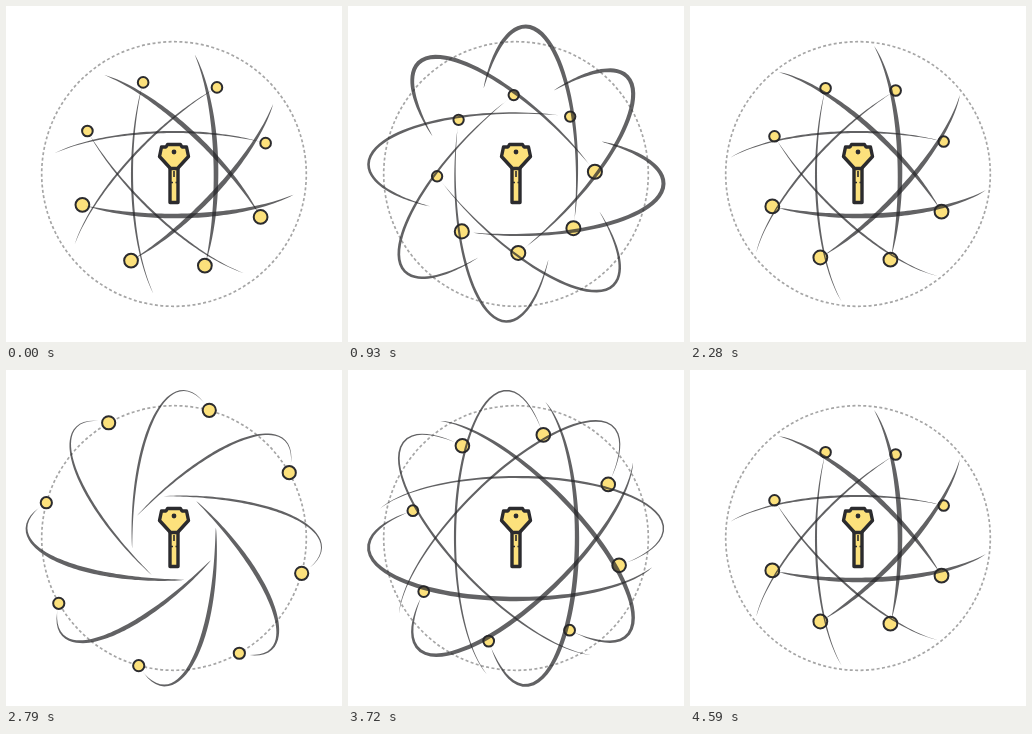
An HTML page that plays this animation: 336 px wide and 336 px high, repeating every 4620 ms.

```html
<!DOCTYPE html>
<html lang="en">
<head>
<meta charset="utf-8">
<title>Key atom</title>
<style>
  html, body { margin: 0; width: 100%; height: 100%; overflow: hidden; background: #fff; }
  svg { display: block; width: 100vw; height: 100vh; }
</style>
</head>
<body>
<svg viewBox="0 0 336 336">
  <circle id="ring" r="132.3" fill="none" stroke="#a6a6a6" stroke-width="1.7" pathLength="831.6" stroke-dasharray="3 2.4"/>
  <g stroke="#2b2b2e" stroke-width="3.4" stroke-linejoin="round" fill="#fce17c">
    <path d="M164 161H172V196.5H164Z"/>
    <path d="M161.5 138.5H174.5L176 141H180.5L182.5 150.5L171.5 162.5H164.5L153.5 150.5L155.5 141H160Z"/>
    <circle cx="168" cy="146" r="2.4" fill="#2b2b2e" stroke="none"/>
    <path d="M168 165V171M165 176.5H167M169.5 176.5H172" stroke-width="1.6" fill="none"/>
  </g>
  <g id="balls" transform="translate(168 168)" fill="#fce17c" stroke="#2b2b2e" stroke-width="2"></g>
  <g id="trails" transform="translate(168 168)" fill="#262629" fill-opacity=".72"></g>
</svg>
<script>
const PERIOD = 2310, LOOP = 2 * PERIOD, TRAIL = 960, STEPS = 64;
const A = 147.5, B = 51.5, SHIFT = 9.5;
const DASHES = 154, DRIFT = 5;
const RAD = Math.PI / 180;

// Arc length along the orbit, one entry per half degree
const arc = [0];
for (let i = 0; i < 720; i++) {
  const q = (i + 0.5) / 2 * RAD;
  arc.push(arc[i] + Math.hypot(A * Math.sin(q), B * Math.cos(q)) * RAD / 2);
}
const LENGTH = arc[720];

function arcAt(deg) {
  const i = Math.floor(deg * 2);
  return arc[i] + (arc[i + 1] - arc[i]) * (deg * 2 - i);
}

function angleAt(s) {
  s = ((s % LENGTH) + LENGTH) % LENGTH;
  let lo = 0, hi = 720;
  while (hi - lo > 1) {
    const mid = (lo + hi) >> 1;
    if (arc[mid] <= s) lo = mid; else hi = mid;
  }
  return (lo + (s - arc[lo]) / (arc[hi] - arc[lo])) / 2 * RAD;
}

// Time and orbit angle of the pace changes
const keys = [[375, 0], [930, 111.4], [1410, 225.5], [1740, 258], [2310, 308.3]]
  .map(([t, deg]) => [t, arcAt(deg)]);
const N = keys.length;

function key(i) {
  const turn = Math.floor(i / N), k = keys[i - turn * N];
  return [k[0] + turn * PERIOD, k[1] + turn * LENGTH];
}

function slope(i) {
  const [t0, s0] = key(i - 1), [t1, s1] = key(i), [t2, s2] = key(i + 1);
  const h0 = t1 - t0, h1 = t2 - t1;
  return ((s1 - s0) / h0 * h1 + (s2 - s1) / h1 * h0) / (h0 + h1);
}

function angle(t) {
  t = ((t % PERIOD) + PERIOD) % PERIOD;
  let i = -1;
  while (key(i + 1)[0] <= t) i++;
  const [t0, s0] = key(i), [t1, s1] = key(i + 1);
  const h = t1 - t0, u = (t - t0) / h, v = 1 - u;
  return angleAt(s0 * v * v * (1 + 2 * u) + s1 * u * u * (3 - 2 * u)
    + h * u * v * (slope(i) * v - slope(i + 1) * u));
}

const point = q => [A * Math.cos(q), SHIFT + B * Math.sin(q)];

function add(parent, tag, turn) {
  const el = document.createElementNS("http://www.w3.org/2000/svg", tag);
  el.setAttribute("transform", `rotate(${turn})`);
  document.getElementById(parent).appendChild(el);
  return el;
}

const ring = document.getElementById("ring");
const orbits = [];
for (let k = 0; k < 8; k++) {
  orbits.push({
    side: k < 4 ? 1 : -1,
    ball: add("balls", "circle", -45 * k),
    trail: add("trails", "path", -45 * k)
  });
}

// Tapered ribbon following the recent motion, as wide as its middle is near
function ribbon(angles, side) {
  const left = [], right = [];
  const width = 3.4 + 1.3 * side * Math.sin(angles[Math.round(STEPS * 0.45)]);
  angles.forEach((q, i) => {
    const u = Math.max(0, (i / STEPS - 0.03) / 0.97);
    const w = width / 2 * Math.pow(Math.max(0, Math.sin(Math.PI * u)), 0.65);
    const [x, y] = point(q);
    const nx = B * Math.cos(q), ny = A * Math.sin(q), n = Math.hypot(nx, ny);
    const dx = nx / n * w, dy = ny / n * w;
    left.push((x + dx).toFixed(2) + " " + (y + dy).toFixed(2));
    right.unshift((x - dx).toFixed(2) + " " + (y - dy).toFixed(2));
  });
  return "M" + left.concat(right).join("L") + "Z";
}

function draw(t) {
  const angles = [];
  for (let i = 0; i <= STEPS; i++) angles.push(angle(t - TRAIL * i / STEPS));
  const [x, y] = point(angles[0]);
  const near = ribbon(angles, 1), far = ribbon(angles, -1);
  for (const { side, ball, trail } of orbits) {
    ball.setAttribute("cx", x);
    ball.setAttribute("cy", y);
    ball.setAttribute("r", 6.1 + side * Math.sin(angles[0]));
    trail.setAttribute("d", side > 0 ? near : far);
  }
  const turn = (t / LOOP - 0.7) * DRIFT * 360 / DASHES;
  ring.setAttribute("transform", `translate(168 168) rotate(${turn})`);
}

const start = performance.now();
function tick() {
  draw((performance.now() - start) % LOOP);
  requestAnimationFrame(tick);
}
tick();
</script>
</body>
</html>
```
